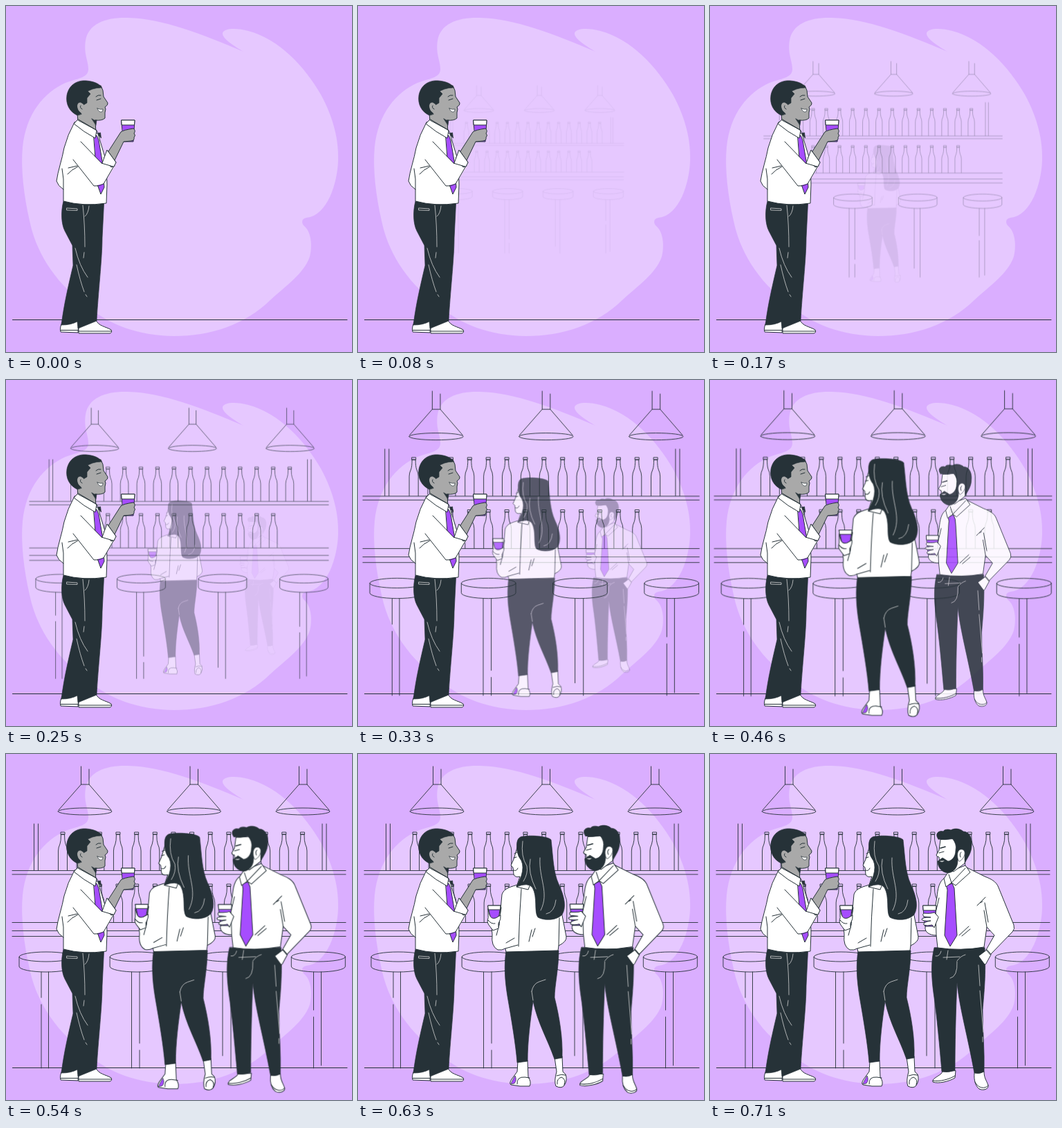
Animation, 500 px wide and 500 px high, one loop 750 ms. Source, as an HTML page:

```html
<!DOCTYPE html>
<html lang="en">
<head>
<meta charset="utf-8">
<title>After-work drinks</title>
<style>
html, body { margin: 0; width: 100%; height: 100%; overflow: hidden; background: #daaeff; }
svg { display: block; width: 100%; height: 100%; fill: none; stroke: #263238; stroke-linejoin: round; stroke-linecap: round; }
.w { fill: #fff; }
.d { fill: #263238; stroke-width: .7; }
.g { fill: #a9a9a9; }
.p { fill: #a64dff; }
.s { stroke: #dcdcdc; stroke-width: .75; }
#bar { transform-origin: 250px 236px; stroke-width: .9; }
#woman { transform-origin: 244.5px 300.5px; }
#guest { transform-origin: 373.5px 297px; }
#bar, #woman, #guest { opacity: 0; }
</style>
</head>
<body>
<svg viewBox="0 0 500 500">
  <path fill="#e6c8ff" stroke="none" d="M343 66C330 58 312 47 313 39C316 31 335 32 350 36C395 48 432 88 455 128C474 163 481 195 480 223C479 255 465 303 434 306C427 307 426 314 432 319C441 327 443 347 439 362C431 386 405 404 383 424C345 461 295 477 243 477C190 476 150 461 116 433C66 396 42 350 34 310C26 275 21 235 24 204C29 155 55 125 86 111C107 104 119 103 119 91C119 79 112 69 115 50C119 25 145 16 176 17C225 18 285 41 343 66Z"/>
  <path d="M9.500 453.500H493"/>

  <g id="bar">
    <path d="M9 168.500H491M9 174H491M9 243.500H491M9 255.500H491M9 263.500H491M40.500 101V168M46.500 101V168M457 101V168M463 101V168"/>
  </g>

  <g id="guest">
    <!-- shoes and trousers -->
    <path class="w" d="M336 459L334 462C328 467 321 469 322 474C330 477 346 473 354 468L355 458ZM382 461C381 472 384 480 389 484C395 487 403 484 402 479C400 472 396 469 396 459Z"/>
    <path d="M322 472C332 474 346 470 354 465M383 474C388 484 398 484 402 479"/>
    <path class="d" d="M324 280C319 300 320 322 323 345C328 378 332 425 335 459Q345 461 354 457C354 420 355 375 357 330C360 365 373 410 382 461Q390 463 396 459C397 430 394 400 394 370C396 345 399 318 397 280Z"/>
    <path class="s" d="M326 292Q332 293 334 285M337 294L361 293M344 284L342 297M357 300Q358 322 347 324M369 290Q362 292 357 299M388 305L390 335M390 342L395 402M394 409V416"/>
    <!-- shirt -->
    <path class="w" d="M339 179C331 184 329 195 328 207L323 234L311 250C310 258 318 262 327 262L329 280Q362 285 396 279L400 250L411 262L399 283L405 290L437 257Q441 253 439 247L417 193C414 184 405 180 397 177L371 164Z"/>
    <path class="w" d="M400 283L388 292L396 303Q398 306 400 301L406 290Z"/>
    <path d="M387 291L394 287M327 262L326 229L331 208M400 250L396 226M402 243L397 215M399 283L405 290M360 262L374 249M364 263L376 253M386 219L398 207M391 215L394 213"/>
    <path class="p" d="M342 190L350 187L353 194L357 262L347 278L339 262L343 197Z"/>
    <path class="w" d="M344 171L338 180L341 192L349 186L355 190L376 171L369 161L356 166Z"/>
    <path d="M349 186L345 174M349 186L369 165"/>
    <!-- head -->
    <path class="w" d="M333 124L331 139L327 146Q328 149 331 149L332 162L352 170L368 158L370 140L367 122Z"/>
    <path class="d" d="M330 123C324 115 331 110 337 112C339 108 346 109 348 110C355 106 363 109 366 112C375 112 379 122 378 132C378 143 372 150 369 156C367 153 369 147 368 142C365 135 359 138 358 146V154C358 164 352 171 344 172C335 171 329 164 329 155L336 150L344 155C350 154 355 148 355 139Q357 130 350 122Q340 125 330 123Z"/>
    <path class="w" stroke-width=".7" d="M359 154C355 144 359 136 365 138C371 140 368 151 361 155Z"/>
    <path d="M331 143L338 141M363 142Q360 144 362 149"/>
    <path stroke-width="1.600" d="M333 136L340 134"/>
    <path class="w" stroke-width=".5" d="M331 154.500L339 154Q336 158 331 154.500Z"/>
    <!-- glass and hand -->
    <path class="p" d="M308 219H327L324 249H311Z"/>
    <path class="w" d="M308 219H327L326.500 226H308.500Z"/>
    <path class="w" d="M324 229Q319 231 309 230Q306 232 309 235L319 236Q306 236 306 239Q307 242 319 241Q307 243 309 247Q313 249 321 247L324 251L330 236Z"/>
  </g>

  <g id="woman">
    <!-- legs and shoes -->
    <path class="w" d="M231 444L230 459L222 470Q218 476 221 478L234 480H248Q251 474 246 467L245 443ZM284 438L287 459Q283 473 286 480Q294 484 298 479Q303 471 300 463L296 459L295 437Z"/>
    <path class="p" stroke-width=".7" d="M223 472L227 465Q230 471 226 476L221 477Z"/>
    <path d="M230 477Q229 466 241 467L248 468M287 465Q294 462 300 464M288 477Q287 469 294 467Q301 470 298 478"/>
    <path class="d" d="M214 284C240 286 270 284 290 284C290 310 284 335 284 352C291 380 296 410 295 439L284 441C274 412 260 390 253 357C249 385 245 415 245 444L230 446C228 420 222 385 216 350C212 325 211 305 214 284Z"/>
    <path class="s" d="M251 343Q253 332 262 329L271 326M251 343L253 356"/>
    <!-- blouse -->
    <path class="w" d="M234 188C220 192 211 194 208 203L204 247L193 249L194 261Q192 278 202 283Q208 284 213 281L214 286Q252 285 289 284L290 277Q302 271 301 264L294 228L262 190Z"/>
    <path d="M236 195Q233 235 232 278M213 281L231 276M204 247L200 262M207 222L203 247M290 277L291 237M251 254L247 271M256 252L252 264M214 273L226 266"/>
    <!-- glass and hand -->
    <path class="p" d="M188 219H206L203 238H192Z"/>
    <path class="w" d="M188 219H206L205.500 225H188.500Z"/>
    <path class="w" d="M188 224L190 232Q192 239 199 237L206 233Q207 238 203 245L203 252L195 255L189 247Q186 243 188 237Z"/>
    <path d="M188 240Q192 246 198 245"/>
    <!-- head -->
    <path class="w" d="M231 132L225 152L221 161L224 164L225 174Q227 179 234 177L229 192L246 196L259 160L248 130Z"/>
    <path d="M225 150L229 149M226 144L230 142M225 168Q229 170 231 165"/>
    <path class="d" d="M230 140C228 124 232 119 240 119C250 117 275 119 279 124C282 150 282 170 290 188C299 207 301 222 295 232C287 241 269 241 260 236C254 228 260 207 252 193Q246 185 229 192L236 176Q240 163 236 154Q231 148 230 140Z"/>
    <path class="s" d="M238 126Q235 148 244 162Q246 173 239 184M249 152Q245 171 257 195M263 150C261 180 277 200 264 226M272 231Q284 229 286 211"/>
  </g>

  <g id="host">
    <!-- shoes and trousers -->
    <path class="w" d="M82 455Q77 465 79 471L104 472L105 455ZM105 464V473H150Q154 472 152 468C144 463 134 463 130 454Z"/>
    <path d="M79 468.500H104M105 470H152"/>
    <path class="d" d="M83 282C79 298 80 315 85 325L96 346L97 375C90 405 84 430 80 461Q94 461 103 456L104 466L131 455C133 415 139 365 139 335L141.500 285Z"/>
    <path class="s" d="M88 292L103 293V295.500L88 295ZM111 288Q114 316 114 348M113 356L112 364M120 289Q119 300 114 304M100 350Q106 376 118 392M102 374Q107 397 113 413M115 417L117 420"/>
    <!-- shirt -->
    <path class="w" d="M99 168Q89 186 84 205C81 222 75 238 73 253Q75 260 83 265L83 282Q112 290 145 285L146 258L145 225L133 185Z"/>
    <path d="M83 265Q84 250 81 235"/>
    <path class="p" d="M127 189L131 187L134 194L139 224L142 262L137 272L132 258Z"/>
    <path class="d" d="M133 184L136.500 183L137.500 191L134 187Z"/>
    <!-- raised arm -->
    <path class="w" stroke="none" d="M106 195L139 228L146 208L159 228L141 257L127 260L92 230Z"/>
    <path d="M108 196L139 228L147 209L159 226L141 257Q134 261 127 260L97 222M89 243Q94 237 104 232M90 234L103 231M141 219L152 233L157 231"/>
    <path class="p" d="M167 165H186L184 196H170Z"/>
    <path class="w" d="M167 165H186L185.500 172H167.500Z"/>
    <path class="g" d="M148 210L166 182Q170 179 184 177Q188 180 185 184Q188 187 185 190Q186 194 181 195L170 196L157 223Z"/>
    <path class="w" d="M139 227L146 208L159 226L156 232Z"/>
    <!-- head -->
    <path class="g" d="M103 154L104 168L130 184L129 165Q139 166 143 162L143 154L144 149L143 146Q148 143 147 140L141 131Q141 121 137 115L112 115L99 138Z"/>
    <path class="d" d="M124 163Q128 166 131 165L130 172Z"/>
    <path class="d" d="M103 158C92 153 86 142 88 129C91 113 104 107 116 108C128 109 136 113 138 118Q131 118 125 120L118 123L122 127L117 133V140L112 143L108 139Q102 139 103 146L109 156Z"/>
    <path class="g" stroke="none" d="M110 155C103 153 101 142 106 140Q112 139 114 147Z"/>
    <path d="M131 136L137 134M130 131Q133 128 137 129M108 144Q106 147 110 149"/>
    <path class="w" stroke-width=".7" d="M132 148Q136 150 140 149Q140 154 136 153Q133 152 132 148Z"/>
    <path class="w" d="M104 164L98 170Q112 182 129 191L131 180Z"/>
    <path d="M104 165L130 179L135 186"/>
  </g>
</svg>
<script>
const $ = id => document.getElementById(id);

const lamp = x => `M${x - 5.5} 18V44L${x - 38} 81M${x + 6} 22V44L${x + 38} 81M${x - 5.5} 44H${x + 6}
  M${x - 39} 83a39 5 0 0 1 78 0a39 5 0 0 1 -78 0`;

const bottle = (x, y) => `M${x - 6.5} ${y}v-28q0 -5 2.500 -10q1.500 -4 1.500 -14h5q0 10 1.500 14q2.500 5 2.500 10v28
  M${x - 3} ${y - 52}v-3h6v3z`;

const seat = x => `M${x - 39} 293a39 7 0 0 1 78 0a39 7 0 0 1 -78 0v14a39 8 0 0 0 78 0v-14`;

// each leg: x, then start and end heights of its strokes
const legs = [
  [51, 315, 352, 362, 454], [61.5, 315, 454],
  [181.5, 315, 454], [193, 315, 418, 428, 454],
  [313, 315, 436], [325, 315, 454],
  [444.5, 315, 370, 380, 454], [455.5, 315, 450]
];
const leg = ([x, ...ys]) => ys.map((y, i) => i % 2 ? `V${y}` : `M${x} ${y}`).join('');
const row = (n, x0, step, draw) => Array.from({ length: n }, (_, i) => draw(x0 + i * step)).join('');

const furniture = document.createElementNS('http://www.w3.org/2000/svg', 'path');
furniture.setAttribute('d',
  row(3, 114, 157.5, lamp) +
  row(14, 82, 26.65, x => bottle(x, 168)) +
  row(12, 108.7, 26.65, x => bottle(x, 243)) +
  row(4, 58, 131.1, seat) +
  legs.map(leg).join(''));
$('bar').append(furniture);

const zoomIn = (id, delay, duration) => {
  const anim = $(id).animate(
    [{ opacity: 0, transform: 'scale(.5)' }, { opacity: 1, transform: 'scale(1)' }],
    { delay, duration, fill: 'both', easing: 'cubic-bezier(.36, -.01, .5, 1.38)' });
  anim.pause();
  return anim;
};
const zooms = [zoomIn('bar', 0, 475), zoomIn('woman', 90, 485), zoomIn('guest', 185, 485)];

// 18 held poses per loop
const loop = 750, poses = 18;
const start = performance.now();
function draw() {
  const t = (performance.now() - start) % loop;
  const pose = Math.floor((t + 6) * poses / loop) % poses;
  for (const z of zooms) z.currentTime = pose * loop / poses;
  requestAnimationFrame(draw);
}
draw();
</script>
</body>
</html>
```
